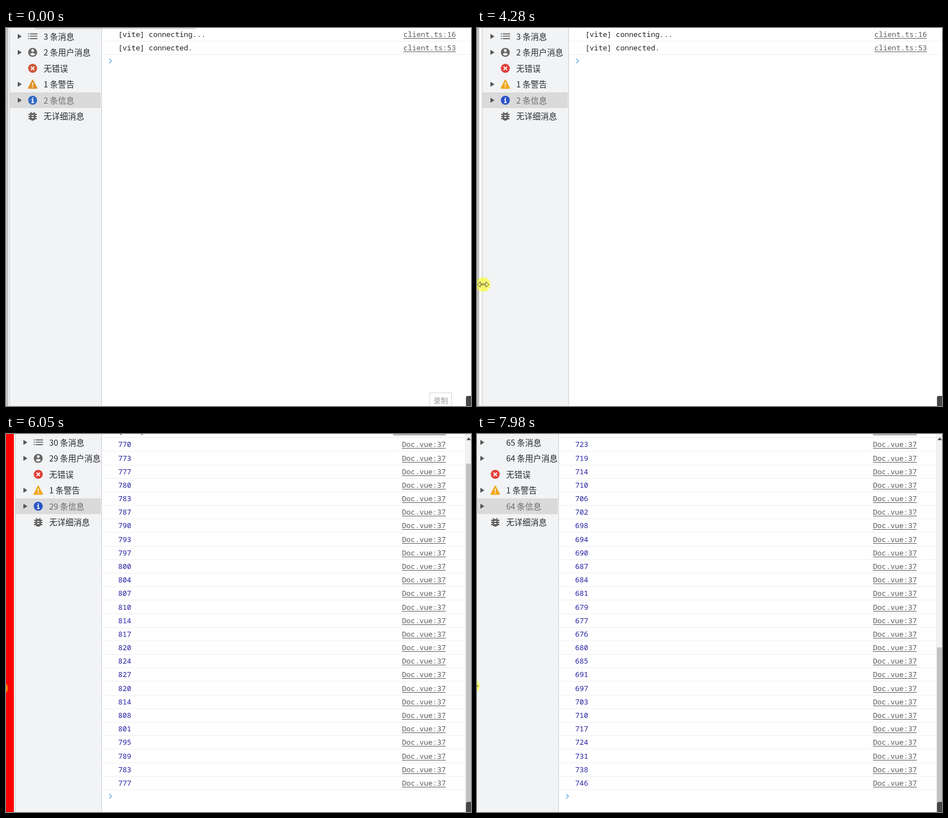
These frames come from a looping animation (829 by 675 pixels, 8000 ms). An HTML page:

```html
<!DOCTYPE html>
<html lang="zh">
<head>
<meta charset="utf-8">
<style>
html, body { margin: 0; width: 100%; height: 100%; overflow: hidden; background: #fff; }
#stage { position: absolute; width: 829px; height: 675px; overflow: hidden; background: #fff; }
#stage div, #stage svg { position: absolute; box-sizing: border-box; }
#page { top: 0; left: -842px; width: 846px; height: 675px; background: red; border-right: 14px solid #c1c1c1; }
#page::after { content: ""; position: absolute; right: 0; top: 0; width: 2px; height: 675px; background: #fff; }
#side { top: 0; height: 675px; overflow: hidden; --err: #cf5639; --warn: #e0902a; --info: #3268c0; }
#side.vivid { --err: #e0403a; --warn: #efa61c; --info: #2852c8; }
#side .bg { left: 4px; right: 0; height: 675px; background: #f1f3f5; border-left: 2px solid #f4f4f4; box-shadow: inset 1px 0 #cbcdd0; }
#side .row { left: 7px; right: 1px; height: 28.5px; padding-left: 60px; white-space: nowrap;
  font: 14.5px/28px "Noto Sans CJK SC", "Noto Sans CJK JP", sans-serif; color: #27292c; }
#side .row.on { background: #dadada; color: #6c6c6c; }
#side svg { left: 0; top: 0; }
#popup { left: 50px; top: -10px; width: 290px; height: 10px; border-radius: 4px; box-shadow: 0 1px 3px #0004; }
#con { top: 0; right: 0; height: 675px; background: #fff; border-left: 1px solid #cacdd1; overflow: hidden; }
#rows { left: 0; right: 0; top: 0; }
#rows .row { left: 0; right: 0; height: 24px; border-bottom: 1px solid #efefef; padding-left: 29px;
  font: 13px/22px "Noto Sans Mono", monospace; color: #222; white-space: pre; }
#rows .log { color: #231fa0; }
#rows u { position: absolute; right: 27px; color: #5a5a5e; text-underline-offset: 2px; }
.scroll #rows { right: 11px; }
.scroll #rows u { right: 34px; }
#prompt { left: 12px; }
#bar { right: 0; top: 0; width: 11px; height: 675px; background: #f1f1f1; display: none; }
.scroll #bar { display: block; }
#thumb { left: 2px; right: 0; bottom: 18px; background: #c1c1c1; }
#bar svg { left: 3px; top: 5px; }
#corner { left: 820px; top: 657px; width: 12px; height: 20px; background: #474747; border-radius: 3px 0 0 0; }
#rec { left: 755px; top: 651px; width: 40px; height: 30px; border: 1px solid #d4d4d4; color: #999; text-align: center;
  font: 13px/25px "Noto Sans CJK SC", "Noto Sans CJK JP", sans-serif; }
#cur { left: 0; top: 0; overflow: visible; }
</style>
</head>
<body>
<div id="stage">
  <div id="page"></div>
  <div id="side">
    <div class="bg"></div>
    <svg width="260" height="200" fill="none" stroke-width="1.8">
      <defs><path id="tri" d="M21-4.500l7 4.500-7 4.500z" fill="#555"/></defs>
      <use href="#tri" y="15"/><use href="#tri" y="43.5"/><use href="#tri" y="100.5"/><use href="#tri" y="129"/>
      <g class="late">
        <path d="M39.500 10.500h2m1.500 0h13M39.500 14.700h2m1.500 0h13M39.500 19h2m1.500 0h13" stroke="#6e6e6e"/>
        <circle cx="47.5" cy="43.5" r="8" fill="#666"/>
        <circle cx="47.5" cy="40.3" r="2.5" fill="#f1f3f5"/>
        <path d="M42.600 46.800q4.900-4.800 9.800 0q-4.900 5-9.800 0z" fill="#f1f3f5"/>
        <circle cx="47.5" cy="129" r="8" fill="var(--info)"/>
        <path d="M47.700 124v2.300M45.500 128h2.200v5M45.300 133.200h4.700" stroke="#fff"/>
      </g>
      <circle cx="47.5" cy="72" r="8" fill="var(--err)"/>
      <path d="M44.500 69l6 6m0-6l-6 6" stroke="#fff"/>
      <path d="M47.500 93L55 107.500H40z" fill="var(--warn)" stroke="var(--warn)" stroke-linejoin="round"/>
      <path d="M47.500 97.500v5m0 1.600v2" stroke="#fff"/>
      <g transform="translate(47.5 158)">
        <path d="M-7.500-4h15M-7.500 0h15M-7.500 4h15M-4-7.500l3 3M4-7.500l-3 3" stroke="#5f5f5f"/>
        <rect x="-5.2" y="-6" width="10.4" height="13.5" rx="5" fill="#5f5f5f"/>
        <path d="M-2-1.800h4M-2 2h4" stroke="#f1f3f5"/>
      </g>
    </svg>
  </div>
  <div id="con">
    <div id="rows"><svg id="prompt" width="8" height="10"><path d="M1 1l4 4-4 4" fill="none" stroke="#6db3ea" stroke-width="1.7"/></svg></div>
    <div id="bar"><div id="thumb"></div><svg width="8" height="6"><path d="M0 6l4-5 4 5z" fill="#505050"/></svg></div>
  </div>
  <div id="popup"></div>
  <div id="rec">录制</div>
  <div id="corner"></div>
  <svg id="cur" width="1" height="1">
    <circle r="13" fill="#ff0" fill-opacity=".53"/>
    <path id="resize" d="M-10 0l5-5v4h10v-4l5 5-5 5v-4h-10v4z" fill="#ffffa0" stroke="#55501c"/>
    <path id="arrow" d="M.5.500v16l3.700-3.500 2.500 5.500 2.300-1-2.500-5.300h5z" fill="#fff" stroke="#222"/>
  </svg>
</div>
<script>
const $ = id => document.getElementById(id);
const PITCH = 24.18, LOGS = 61;

// moves: [start, end, change], each eased in and out
const glide = (t, from, moves) => moves.reduce((v, [a, b, d]) => {
  const p = Math.min(1, Math.max(0, (t - a) / (b - a)));
  return v + d * p * p * (3 - 2 * p);
}, from);

const pointerX = t => glide(t, 760, [
  [20, 810, -565], [830, 1220, -24],                       // reach the divider
  [1500, 2300, 55], [2320, 2520, -12], [2660, 3150, -53],  // drag it
  [3150, 3480, -133], [3500, 3870, -20],                   // reach the panel edge
  [4100, 5350, 52], [5350, 5680, -32], [5730, 6490, -98], [6700, 7980, 62]]);
const pointerY = t => glide(t, 668, [[20, 810, -202], [1500, 2690, 4], [2690, 3480, -12], [4100, 7980, -8]]);
const panelX = t => glide(t, 0, [[4120, 5300, 54], [5600, 6750, -128], [6850, 7980, 59]]);
const dividerX = t => t < 1555 ? 170 : pointerX(Math.min(t - 55, 3150)) - 1;
const logCount = t => Math.floor(Math.max(0, t < 5560 ? (t - 4300) / 68 : 18 + (t - 5560) / 56));

// page width logged by step k: grows, shrinks, grows again
const pageWidth = k => Math.round(
  k < 18 ? 770 + 57 * k / 17 :
  k < 50 ? 676 + 151 * ((49 - k) / 32) ** 1.4 :
  676 + 70 * ((k - 49) / 11) ** 1.2);

function addRow(parent, top, cls) {
  const el = document.createElement("div");
  el.className = "row " + cls;
  el.style.top = top + "px";
  return parent.appendChild(el);
}

const sideRows = Array.from({ length: 6 }, (_, i) => addRow($("side"), 0.5 + 28.55 * i, i == 4 ? "on" : ""));
$("side").append($("side").querySelector("svg"));

const lines = [["[vite] connecting...", "client.ts:16"], ["[vite] connected.", "client.ts:53"]];
for (let k = 0; k < LOGS; k++) lines.push([pageWidth(k), "Doc.vue:37"]);
const conRows = lines.map(([text, link], i) => {
  const el = addRow($("rows"), i * PITCH - 0.3, i > 1 ? "log" : "");
  el.innerHTML = `${text}<u>${link}</u>`;
  return el;
});
const lateIcons = document.querySelector(".late");

const show = (el, on) => el.style.visibility = on ? "visible" : "hidden";
const px = (el, prop, v) => el.style[prop] = v + "px";

function draw(t) {
  const left = Math.round(panelX(t));
  const width = Math.round(dividerX(t));
  const n = Math.min(LOGS, logCount(t));
  const user = n + (n > 18 ? 3 : 2);

  // the page repaints a little after the panel
  px($("page"), "left", Math.round(panelX(t - 130)) - 842);
  px($("side"), "left", left);
  px($("side"), "width", width);
  px($("con"), "left", left + width);

  [`${user + 1} 条消息`, `${user} 条用户消息`, "无错误", "1 条警告", `${user} 条信息`, "无详细消息"]
    .forEach((s, i) => sideRows[i].textContent = s);
  $("side").classList.toggle("vivid", t >= 1520);
  show(lateIcons, t < 6600);

  conRows.forEach((el, i) => show(el, i < n + 2));
  const promptY = 59 + PITCH * n;
  const scroll = Math.max(0, promptY - 647);
  px($("prompt"), "top", promptY - 5);
  px($("rows"), "top", -scroll);
  $("con").classList.toggle("scroll", scroll > 0);
  px($("thumb"), "top", 16 + 641 * scroll / (84 + PITCH * n));

  show($("popup"), t < 1500);
  show($("rec"), t < 100);
  show($("cur"), t >= 20);
  $("cur").style.transform = `translate(${pointerX(t)}px,${pointerY(t)}px)`;
  const arrow = t < 1150 || (t > 3180 && t < 3750);
  $("arrow").style.display = arrow ? "" : "none";
  $("resize").style.display = arrow ? "none" : "";
}

const start = performance.now();
function tick(now) {
  draw(Math.max(0, now - start) % 8000);
  requestAnimationFrame(tick);
}
draw(0);
requestAnimationFrame(tick);
</script>
</body>
</html>
```
